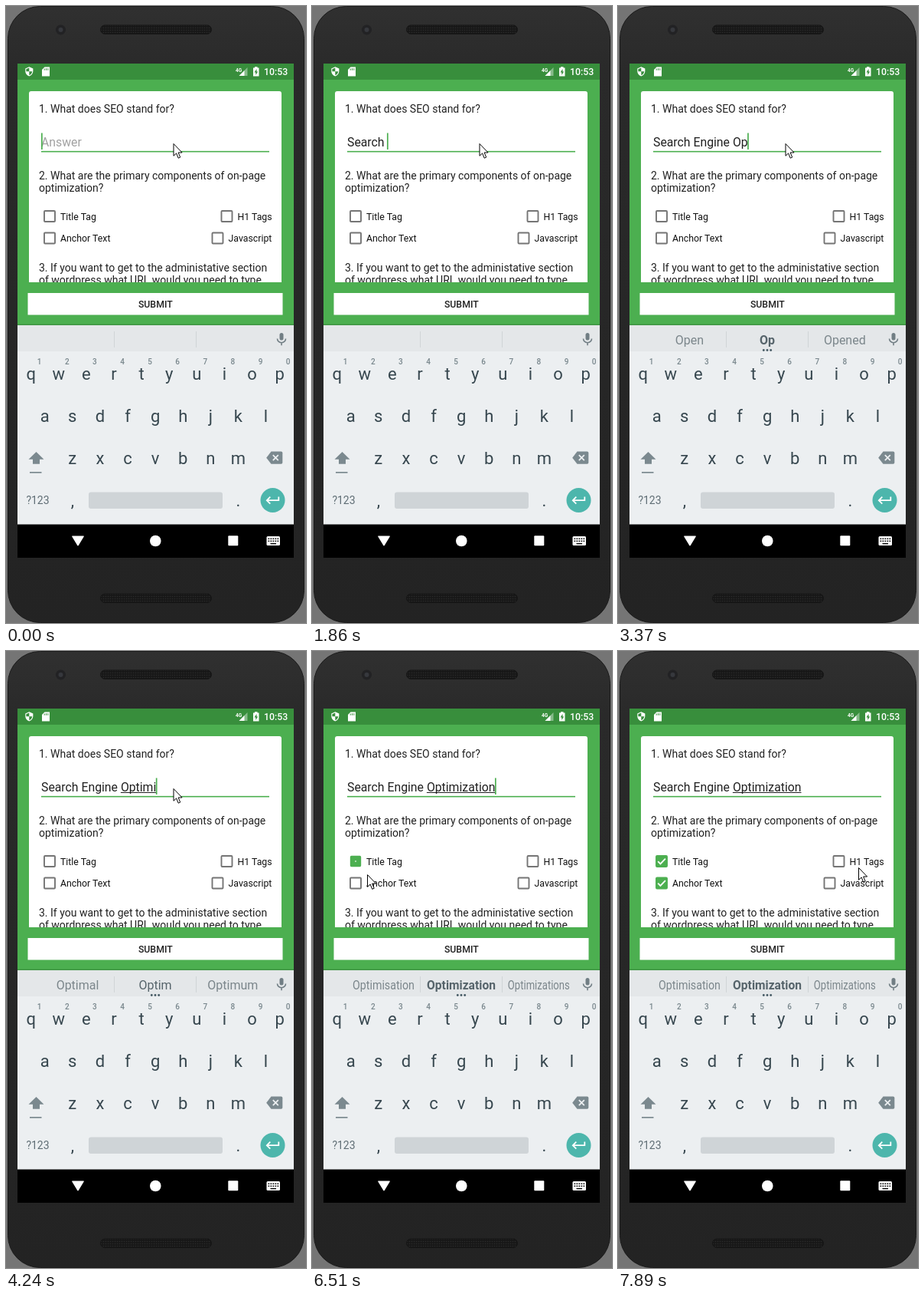
An HTML page that plays this animation: 392x804 px, repeating every 8000 ms.

```html
<!DOCTYPE html>
<html lang="en">
<head>
<meta charset="utf-8">
<title>SEO quiz</title>
<style>
html, body { margin: 0; width: 100%; height: 100%; overflow: hidden; background: #757575; }
svg { display: block; width: 392px; height: 804px; font-family: Roboto, sans-serif; }
text { white-space: pre; }
.q { font-size: 14px; fill: #212121; }
.label { font-size: 12.3px; fill: #111; }
.key { font-size: 22px; fill: #37474f; text-anchor: middle; }
.digit { font-size: 10px; font-weight: 500; fill: #78868c; text-anchor: middle; }
.hint { font-size: 16px; fill: #7b868b; text-anchor: middle; }
.answer { font-size: 15.8px; fill: #212121; }
</style>
</head>
<body>
<svg id="stage" viewBox="0 0 392 804" xmlns="http://www.w3.org/2000/svg">
  <defs>
    <linearGradient id="body" x2="0" y2="1">
      <stop offset="0" stop-color="#303030"/><stop offset=".1" stop-color="#2a2a2a"/>
      <stop offset="1" stop-color="#232323"/>
    </linearGradient>
    <pattern id="mesh" width="3" height="3" patternUnits="userSpaceOnUse">
      <rect width="3" height="3" fill="#171717"/><circle cx="1.5" cy="1.5" r=".8" fill="#2b2b2b"/>
    </pattern>
    <clipPath id="scroll"><rect x="30" y="111" width="330" height="249"/></clipPath>
  </defs>

  <!-- phone -->
  <rect width="392" height="804" fill="#757575"/>
  <rect x="2.500" y=".5" width="387" height="803" rx="42" fill="url(#body)" stroke="#191919"/>
  <rect x="123.500" y="25" width="145" height="11.500" rx="5.700" fill="url(#mesh)" stroke="#151515"/>
  <rect x="123.500" y="766" width="145" height="11.500" rx="5.700" fill="url(#mesh)" stroke="#151515"/>
  <circle cx="71.500" cy="31" r="6.500" fill="#222224"/><circle cx="71.500" cy="31" r="3" fill="#36383d"/>

  <!-- app -->
  <rect x="15" y="75" width="361" height="644" fill="#000"/>
  <rect x="15" y="75" width="361" height="341" fill="#4caf50"/>
  <rect x="15" y="75" width="361" height="21" fill="#388e3c"/>
  <g fill="#fff">
    <path transform="translate(23.600 78.600) scale(.56)" fill-rule="evenodd"
      d="M12 1L3 5v6c0 5.550 3.840 10.740 9 12 5.160-1.260 9-6.450 9-12V5zM12 12h7c-.53 4.120-3.280 7.790-7 8.940V12H5V6.300l7-3.110z"/>
    <path d="M50.500 79.500h6.500v12h-10v-8.500z"/>
    <path d="M50.200 81.500v2.300M52.500 81.200v2.600M54.800 81.200v2.600" stroke="#388e3c"/>
    <text x="300" y="85.500" font-size="6.500" font-weight="700">4G</text>
    <path d="M315.500 80v11h-11z" opacity=".4"/><path d="M311.500 84v7h-7z"/>
    <path d="M323 80.500h2v-1.300h3.500v1.300h2v11h-7.500z"/>
    <path d="M327.500 82l-3 4.500h1.800v3.500l2.800-4.600h-1.600z" fill="#388e3c"/>
    <text x="337" y="90" font-size="12.300" font-weight="500">10:53</text>
  </g>
  <path d="M30 360V114a3 3 0 0 1 3-3H357a3 3 0 0 1 3 3V360z" fill="#fff"/>
  <g clip-path="url(#scroll)">
    <text class="q" x="43" y="139">1. What does SEO stand for?</text>
    <text class="q" x="43" y="226">2. What are the primary components of on-page</text>
    <text class="q" x="43" y="242">optimization?</text>
    <text class="q" x="43" y="346">3. If you want to get to the administative section</text>
    <text class="q" x="43" y="362">of wordpress what URL would you need to type</text>
    <text class="label" x="71" y="279">Title Tag</text>
    <text class="label" x="302.500" y="279">H1 Tags</text>
    <text class="label" x="71" y="307">Anchor Text</text>
    <text class="label" x="290.500" y="307">Javascript</text>
    <rect x="46" y="188.900" width="298" height="1.600" fill="#4caf50"/>
    <text id="empty" class="answer" x="46" y="182.500" style="fill:#a2a2a2">Answer</text>
    <text id="answer" class="answer" x="46" y="182.500"></text>
    <rect id="under" y="184" height="1" fill="#212121"/>
    <rect id="caret" y="165.500" width="1.700" height="21.500" fill="#4caf50"/>
    <g id="boxes"></g>
  </g>
  <rect x="28.500" y="374" width="333" height="28.500" fill="#fff"/>
  <text x="195.300" y="392.500" font-size="12.300" font-weight="500" fill="#212121" text-anchor="middle">SUBMIT</text>

  <!-- keyboard -->
  <rect x="15" y="414.500" width="361" height="1.500" fill="#3f9643"/>
  <rect x="15" y="416" width="361" height="259.500" fill="#eceff1"/>
  <rect x="15" y="416" width="361" height="34" fill="#e4e7e9"/>
  <path d="M141.500 424v21M248.500 424v21" stroke="#d0d4d6"/>
  <g id="hints"></g>
  <g id="dots" fill="#455a64"><circle cx="190.300" cy="448.500" r="1.400"/><circle cx="195" cy="448.500" r="1.400"/><circle cx="199.700" cy="448.500" r="1.400"/></g>
  <g stroke="#717e84" fill="none" stroke-width="1.600">
    <rect x="357.500" y="426" width="5" height="9.500" rx="2.500" fill="#717e84" stroke="none"/>
    <path d="M354.500 433.500a5.500 5.200 0 0 0 11 0M360 438.500v3.800"/>
  </g>
  <g id="keys"></g>
  <path d="M39.500 581l10 9.700h-5.500v6h-9v-6h-5.500z" fill="#7b898f"/>
  <rect x="31" y="607" width="15.500" height="1.700" fill="#7b898f"/>
  <path d="M346.500 580.500H359.500a1.800 1.800 0 0 1 1.800 1.800V595a1.800 1.800 0 0 1-1.800 1.800H346.500l-6.300-8.100z" fill="#7b898f"/>
  <path d="M348.800 585.200l7 7m0-7l-7 7" stroke="#eceff1" stroke-width="1.800"/>
  <text x="41.500" y="649" font-size="14" fill="#5f6d74" text-anchor="middle">?123</text>
  <rect x="108" y="633.500" width="175" height="21.500" rx="3" fill="#cfd4d7"/>
  <circle cx="348.500" cy="644" r="16" fill="#4db6ac"/>
  <path d="M356.300 639.500v4.700h-15M345.300 639.700l-4.500 4.500 4.500 4.500" fill="none" stroke="#fff" stroke-width="1.800"/>

  <!-- navigation -->
  <g fill="#fff">
    <path d="M86.800 690.500h14.400a.6.6 0 0 1 .5 1l-7 11.500a.8.8 0 0 1-1.400 0l-7-11.500a.6.6 0 0 1 .5-1z"/>
    <circle cx="195.300" cy="697" r="7.300"/>
    <rect x="290.300" y="690.300" width="13" height="13" rx="1"/>
    <rect x="340.500" y="691" width="17.500" height="12" rx="1.500"/>
    <path d="M342.500 694.300h14M342.500 697.300h14" stroke="#000" stroke-width="1.500" stroke-dasharray="1.700 1.300"/>
    <path d="M345.500 700.600h7.500" stroke="#000" stroke-width="1.400"/>
  </g>

  <path id="mouse" d="M.5 .5V16.300L4.100 12.900 6.700 19.200 9.200 18.100 6.600 12H11.600z" fill="#fff" stroke="#000" stroke-linejoin="round"/>
</svg>
<script>
const LOOP = 8000;
const $ = id => document.getElementById(id);

function add(parent, tag, attrs, text) {
  const el = document.createElementNS('http://www.w3.org/2000/svg', tag);
  for (const k in attrs) el.setAttribute(k, attrs[k]);
  if (text) el.textContent = text;
  parent.appendChild(el);
  return el;
}
function set(el, attrs) {
  for (const k in attrs) el.setAttribute(k, attrs[k]);
}
const show = (el, on) => set(el, { visibility: on ? 'visible' : 'hidden' });
const ramp = (t, a, b) => Math.min(1, Math.max(0, (t - a) / (b - a)));
const ease = p => p * p * (3 - 2 * p);

// Keyboard letters
['qwertyuiop', 'asdfghjkl', ' zxcvbnm'].forEach((row, r) => {
  [...row].forEach((c, i) => {
    const x = (r ? 50.7 : 32.7) + 36.1 * i;
    add($('keys'), 'text', { class: 'key', x, y: 487 + 55 * r }, c.trim());
    if (!r) add($('keys'), 'text', { class: 'digit', x: x + 11, y: 467 }, String((i + 1) % 10));
  });
});
add($('keys'), 'text', { class: 'key', x: 87, y: 652 }, ',');
add($('keys'), 'text', { class: 'key', x: 303.3, y: 652 }, '.');

// Check boxes: centre and time of the tap
const boxes = [[57, 274, 6380], [57, 302.5, 7130], [288.5, 274], [276.5, 302.5]].map(([x, y, tap = Infinity]) => {
  const ripple = add($('boxes'), 'circle', { cx: x, cy: y, fill: '#000' });
  const g = add($('boxes'), 'g', {});
  const frame = add(g, 'rect', { x: -7, y: -7, width: 14, height: 14, rx: 1, fill: 'none', 'stroke-width': 1.9 });
  const fill = add(g, 'path', { fill: '#4caf50', 'fill-rule': 'evenodd' });
  const tick = add(g, 'path', { d: 'M-4.8 .2L-1.6 3.4 4.9 -3.3', fill: 'none', stroke: '#fff',
    'stroke-width': 1.9, pathLength: 1, 'stroke-dasharray': '1 2' });
  return { x, y, tap, ripple, g, frame, fill, tick };
});

function drawBox(b, t) {
  const on = t >= b.tap, age = on ? t - b.tap : 0;
  const shrink = ramp(age, 0, 150), grow = ramp(age, 150, 320);
  const size = 1 - 0.11 * (shrink - grow);
  const hole = 6 * (1 - shrink);
  set(b.g, { transform: `translate(${b.x} ${b.y}) scale(${size})` });
  set(b.frame, { stroke: on ? '#4caf50' : '#757575' });
  set(b.fill, { d: `M-7-7H7V7H-7zM${-hole} ${-hole}H${hole}V${hole}H${-hole}z` });
  show(b.fill, on);
  set(b.tick, { 'stroke-dashoffset': 1 - ease(grow) });
  show(b.tick, grow > 0);
  set(b.ripple, { r: 8 + 9.5 * ramp(age, 130, 300), opacity: 0.06 * ramp(age, 130, 200) * (1 - ramp(age, 330, 550)) });
}

// Typing: time, text (_ ends it when the last word is underlined), suggestions (* marks bold)
const E = 'Search Engine ';
const steps = [
  [0, ''], [60, 'S'], [200, 'S_', 'Su S So'], [440, 'Se', 'Su S So'], [580, 'Se_', 'See Se Sent'],
  [1060, 'Sea_', 'Seat *Sea Search'], [1160, 'Sear', 'Seat *Sea Search'], [1240, 'Sear_', 'Seat *Sear Search'],
  [1340, 'Searc_', 'Seat Searc Search'], [1460, 'Search_', 'Seared *Search Searches'],
  [1580, 'Search', 'Seared *Search Searches'], [1820, 'Search ', 'Seared *Search Searches'], [1860, 'Search '],
  [2000, 'Search E'], [2030, 'Search E', 'Ex E Eat'], [2170, 'Search En_', 'End En Enjoy'],
  [2300, 'Search Eng_', 'English Eng Engine'], [2500, 'Search Engi_', 'English Eng Engine'],
  [2580, 'Search Engin_', 'English Engin Engine'], [2640, 'Search Engine_', 'English *Engine Engines'],
  [2720, 'Search Engine', 'English *Engine Engines'], [2860, E, 'English *Engine Engines'],
  [3060, E], [3140, E + 'O'], [3200, E + 'O_', 'Of O On'], [3320, E + 'Op', 'Open *Op Opened'],
  [3410, E + 'Op_', 'Open *Op Opened'], [3520, E + 'Opt_', 'Opted *Opt Option'],
  [3720, E + 'Opti_', 'Optic Opti Option'], [3920, E + 'Optim', 'Optic Opti Option'],
  [4030, E + 'Optim_', 'Optimal Optim Optimum'], [4170, E + 'Optimi_', 'Optimal Optim Optimum'],
  [4270, E + 'Optimi_', 'Optimize Optimi Optimization'], [4410, E + 'Optimiz_', 'Optimize Optimi Optimization'],
  [4580, E + 'Optimiz_', 'Optimization Optimiz Optimizations'], [4720, E + 'Optimiza_', 'Optimisation Optimiza Optimizations'],
  [4830, E + 'Optimizat_', 'Optimisation Optimizat Optimizations'], [4920, E + 'Optimizati_', 'Optimisation Optimizati Optimizations'],
  [5010, E + 'Optimizatio_', 'Optimisation Optimizatio Optimizations'],
  [5100, E + 'Optimization_', 'Optimisation *Optimization Optimizations']
];

const pen = document.createElement('canvas').getContext('2d');
function width(text, font) {
  pen.font = font + ' Roboto, sans-serif';
  return pen.measureText(text).width;
}
const typed = text => width(text, '15.8px');

const hints = [[93.5, 81], [195, 90], [296.3, 81]].map(([x, room]) => {
  return { x, room, el: add($('hints'), 'text', { class: 'hint' }) };
});

// Long words are condensed to the room in their cell, as the keyboard does
function drawHints(list) {
  const words = list ? list.split(' ') : ['', '', ''];
  hints.forEach(({ x, room, el }, i) => {
    const bold = words[i][0] === '*';
    const word = words[i].replace('*', '');
    const fit = Math.min(1, room / Math.max(1, width(word, (bold ? 700 : 400) + ' 16px')));
    el.textContent = word;
    el.style.fontWeight = bold ? 700 : 400;
    el.style.fill = i === 1 ? '#56646b' : '#7b868b';
    set(el, { transform: `translate(${x} 440.5) scale(${fit} 1)` });
  });
  show($('dots'), !!list);
}

let last;
function drawTyping(t) {
  const step = steps.filter(s => s[0] <= t).pop();
  const marked = step[1].endsWith('_');
  const text = step[1].replace('_', '');
  if (step !== last) {
    last = step;
    $('answer').textContent = text;
    show($('empty'), !text);
    const end = 46 + typed(text);
    const from = 46 + typed(text.slice(0, text.lastIndexOf(' ') + 1));
    set($('under'), { x: from, width: Math.max(0, end - from) });
    show($('under'), marked);
    set($('caret'), { x: text ? end - 0.5 : 46 });
    drawHints(step[2]);
  }
  const blink = t > 5100 && Math.floor((t - 5120) / 503) % 2 === 1;
  show($('caret'), !blink);
}

// Pointer moves: start, end, x, y
const moves = [[5370, 5720, 72, 269], [6400, 6600, 72, 307], [7380, 7880, 314, 282]];
function drawMouse(t) {
  let x = 218.5, y = 179;
  for (const [a, b, tx, ty] of moves) {
    const p = ease(ramp(t, a, b));
    x += (tx - x) * p;
    y += (ty - y) * p;
  }
  set($('mouse'), { transform: `translate(${x} ${y})` });
}

function draw(now) {
  const t = now % LOOP;
  drawTyping(t);
  boxes.forEach(b => drawBox(b, t));
  drawMouse(t);
}

const start = performance.now();
function tick() {
  draw(performance.now() - start);
  requestAnimationFrame(tick);
}
tick();
</script>
</body>
</html>
```
